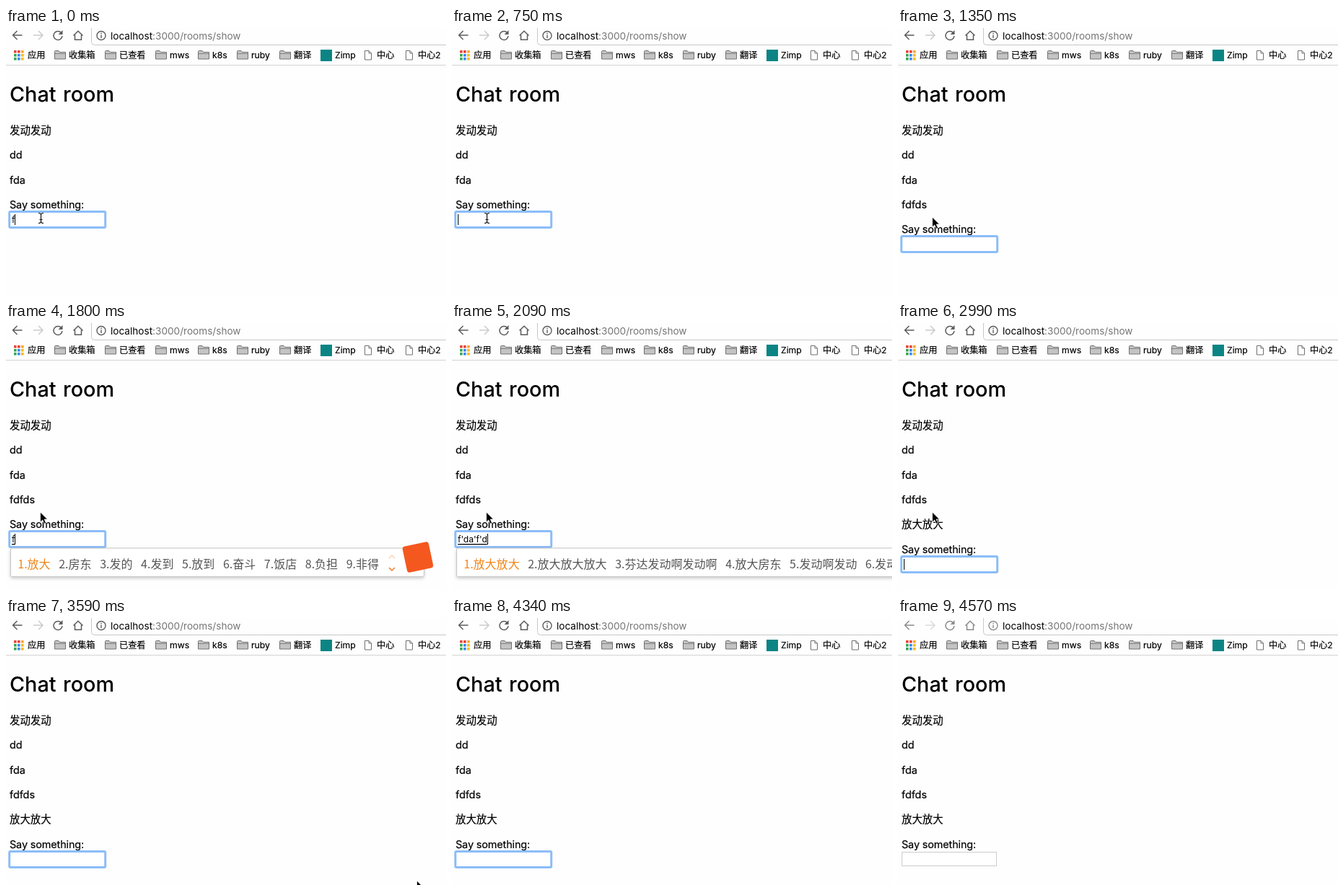
Recreate the animation shown at these times as an HTML page. Size 610 by 370 pixels, loop 4.67 s.

```html
<!DOCTYPE html>
<html lang="zh-CN">
<head>
<meta charset="utf-8">
<title>Chat room</title>
<style>
  html, body { margin: 0; width: 100%; height: 100%; overflow: hidden; background: #fefefe; }
  svg { display: block; font-family: Inter, "Noto Sans CJK SC", "Noto Sans CJK", sans-serif; }
  text { white-space: pre; }
  .line { fill: none; stroke-width: 1.5; }
  #bookmarks { font-size: 12.2px; }
  #page { font-size: 14.4px; }
  #bookmarks text, #messages text, #label { stroke: #000; stroke-width: .2; }
  #title { font-size: 28.8px; font-weight: 500; word-spacing: 1.8px; }
  #label { letter-spacing: -.11px; }
  #typed { font-size: 12px; }
  #popup { font: 16px "Noto Sans CJK SC", "Noto Sans CJK", sans-serif; fill: #555; }
</style>
</head>
<body>
<svg width="610" height="370" viewBox="0 0 610 370">
  <g id="nav" class="line" stroke="#5c5c5c">
    <path d="M22.5 10H10M15.5 4L9.5 10L15.5 16"/>
    <path d="M38 10H50.5M45 4L51 10L45 16" stroke="#ccc"/>
    <path d="M76.5 6.5A6 6 0 1 0 78 11"/>
    <path d="M78.5 3V9H72.5Z" fill="#5c5c5c" stroke="none"/>
    <path d="M93.5 10.5L100 4.2L106.5 10.5M95.5 9.5V16.2H104.5V9.5"/>
    <circle cx="132" cy="10.5" r="6" stroke-width="1.4"/>
    <path d="M132 9.5V14M132 6.8V8.3" stroke-width="1.4"/>
  </g>
  <path d="M118.5 0V19.5Q118.5 23.5 122.5 23.5H610" fill="none" stroke="#c8c8c8"/>
  <text x="145" y="15.5" font-size="13.6">localhost<tspan fill="#757575">:3000/rooms/show</tspan></text>
  <g id="bookmarks"></g>
  <path d="M0 51.5H610" stroke="#d4d4d4"/>
  <g id="page">
    <text id="title" x="5" y="102">Chat room</text>
    <g id="messages"></g>
    <g id="form">
      <text id="label" x="5" y="250">Say something:</text>
      <rect id="idle" x="5.5" y="255.5" width="131" height="19" fill="#fff" stroke="#ccc"/>
      <rect id="ring" x="4.7" y="254.5" width="133" height="22" rx="1.5" fill="#fff" stroke="#8bbdf8" stroke-width="3"/>
      <text id="typed" x="8" y="270"></text>
      <rect id="underline" x="8" y="272" height="1.3"/>
      <rect id="caret" y="258" width="1" height="15"/>
    </g>
  </g>
  <g id="popup">
    <rect id="panel" x="6.5" y="312" height="39.5" rx="2" fill="#fff" stroke="#c6c6c6" style="filter: drop-shadow(0 2px 2px #0003)"/>
    <g id="candidates"></g>
    <g id="extras">
      <path class="line" d="M531 326L535 322L539 326" stroke="#fbd3b5"/>
      <path class="line" d="M531 339L535 343L539 339" stroke="#f47a20"/>
      <rect x="552.5" y="306" width="37" height="37" rx="4" fill="#f4581f" transform="rotate(-12 571 324.5)"/>
    </g>
  </g>
  <path id="arrow" d="M0 0V14L3.2 11L5.5 16.3L8 15.2L5.7 10H10Z" stroke="#fff" stroke-width=".8"/>
  <path id="beam" d="M45 256.5Q48.5 256.5 48.5 259V268Q48.5 270.5 45 270.5M52 256.5Q48.5 256.5 48.5 259M52 270.5Q48.5 270.5 48.5 268M46.5 265.5H50.5" fill="none" stroke="#111" stroke-width="1.2"/>
</svg>
<script>
const $ = id => document.getElementById(id);
const show = (el, on) => { el.style.display = on ? '' : 'none'; };

const folder = x => `<path d="M${x + .5} 43V32.5Q${x + .5} 31.5 ${x + 1.5} 31.5H${x + 6}L${x + 7.5} 33.5H${x + 15.5}V43Z"
  fill="#c4c4c4" stroke="#707070"/><path d="M${x + 1} 35.5H${x + 15}" stroke="#808080"/>`;
const sheet = x => `<path d="M${x + .5} 31.5H${x + 6}L${x + 9.5} 35V44H${x + .5}ZM${x + 6} 31.5V35H${x + 9.5}" fill="#fff" stroke="#707070"/>`;
const square = x => `<rect x="${x}" y="30" width="16" height="16" fill="#0c8484"/>`;
const dots = x => ['#ea4335', '#ea4335', '#f9a825', '#34a853', '#4285f4', '#fbbc05', '#34a853', '#4285f4', '#fbbc05']
  .map((color, i) => `<rect x="${x + i % 3 * 5}" y="${31 + (i / 3 | 0) * 5}" width="3.6" height="3.6" fill="${color}"/>`).join('');

$('bookmarks').innerHTML = [
  [dots, 11, '应用', 30], [folder, 67, '收集箱', 87], [folder, 137, '已查看', 157], [folder, 207, 'mws', 227],
  [folder, 266, 'k8s', 286], [folder, 320, 'ruby', 340], [folder, 379, '翻译', 399],
  [square, 436, 'Zimp', 456], [sheet, 497, '中心', 514], [sheet, 554, '中心2', 571]
].map(([icon, x, label, labelX]) => `${icon(x)}<text x="${labelX}" y="42">${label}</text>`).join('');

const lineStep = 34.4;
$('messages').innerHTML = ['发动发动', 'dd', 'fda', 'fdfds', '放大放大']
  .map((text, i) => `<text x="5" y="${Math.round(146.8 + i * lineStep)}">${text}</text>`).join('');

const shortList = '放大 房东 发的 发到 放到 奋斗 饭店 负担 非得';
const middleList = '放大放 放大 发达 发动 放到 芬达 发大 反弹 发呆 翻倒';
const longList = '放大放大 放大放大放大 芬达发动啊发动啊 放大房东 发动啊发动 发动发动';

// Each step changes part of the state and holds until the next one.
const loop = 4670;
const steps = [
  [0, { typed: 'f', rows: 3, caret: true, focus: true, beam: true, arrow: null, list: '', composing: false }],
  [150, { typed: 'fd' }],
  [300, { typed: 'fdfds' }],
  [750, { typed: '' }],
  [900, { rows: 4, beam: false, arrow: [47.5, 262] }],
  [1350, { caret: false }],
  [1800, { typed: 'f', caret: true, composing: true, list: shortList }],
  [1940, { typed: "f'd", list: middleList }],
  [2090, { typed: "f'da'f'd", list: longList }],
  [2390, { typed: '放大放大', composing: false, list: '' }],
  [2840, { typed: '' }],
  [2990, { rows: 5 }],
  [3290, { arrow: [194.5, 280] }],
  [3440, { arrow: [213, 287], caret: false }],
  [3590, { arrow: [569.5, 364] }],
  [3890, { arrow: null, caret: true }],
  [4340, { caret: false }],
  [4570, { focus: false }]
];

function drawPopup(list) {
  show($('popup'), list);
  if (!list) return;
  const compact = list === shortList;
  show($('extras'), compact);
  $('panel').setAttribute('width', compact ? 573 : 620);
  $('candidates').innerHTML = '';
  let x = 16.3;
  list.split(' ').forEach((word, i) => {
    $('candidates').insertAdjacentHTML('beforeend',
      `<text x="${x}" y="340"${i ? '' : ' fill="#f08519"'}>${i + 1}.${word}</text>`);
    x += $('candidates').lastChild.getComputedTextLength() + 11.6;
  });
}

function draw(state) {
  [...$('messages').children].forEach((el, i) => show(el, i < state.rows));
  $('form').setAttribute('transform', `translate(0 ${Math.round((state.rows - 3) * lineStep)})`);
  $('nav').style.opacity = state.focus ? 1 : .7;
  show($('ring'), state.focus);
  show($('idle'), !state.focus);
  $('typed').textContent = state.typed;
  const width = state.typed ? $('typed').getComputedTextLength() : 0;
  show($('underline'), state.composing);
  $('underline').setAttribute('width', width);
  show($('caret'), state.caret);
  $('caret').setAttribute('x', Math.round(8 + width));
  show($('beam'), state.beam);
  show($('arrow'), state.arrow);
  if (state.arrow) $('arrow').setAttribute('transform', `translate(${state.arrow})`);
  drawPopup(state.list);
}

let drawn = -1;
function tick() {
  const time = performance.now() % loop;
  const past = steps.filter(([start]) => start <= time);
  if (past.length !== drawn) {
    drawn = past.length;
    draw(Object.assign({}, ...past.map(step => step[1])));
  }
  requestAnimationFrame(tick);
}
tick();
</script>
</body>
</html>
```
